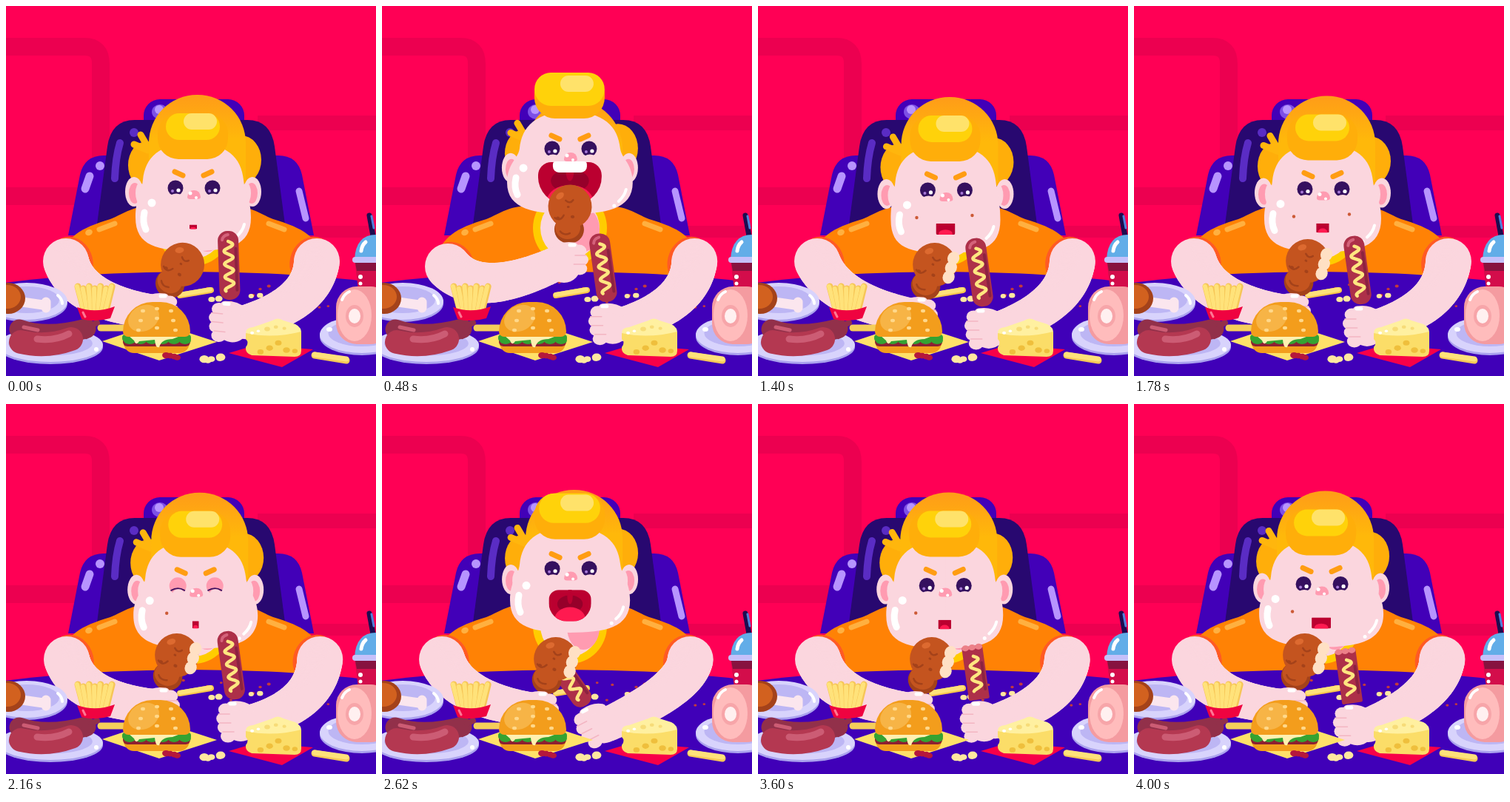
These frames come from a looping animation (500 by 500 pixels, 4020 ms). An HTML page with a canvas:

```html
<!DOCTYPE html>
<html>
<head>
<meta charset="utf-8">
<style>
html, body { margin: 0; width: 100%; height: 100%; overflow: hidden; background: #ff0055; }
canvas { display: block; width: 500px; height: 500px; }
</style>
</head>
<body>
<canvas id="stage" width="500" height="500"></canvas>
<script>
const ctx = document.getElementById('stage').getContext('2d');
const LOOP = 4020, STEP = 20;
const SKIN = '#fbd6de', PINK = '#ff9bb1', PURPLE = '#4200b8', LILAC = '#b794ff';
const HAIR = '#ffae0a', FRY = '#ffe27a', CREAM = '#ffe8a0';
const MEAT = '#c4541f', MEAT_DARK = '#a4421a', SAUSAGE = '#b43851', SAUSAGE_DARK = '#92304a';

const lerp = (a, b, u) => a + (b - a) * u;
const smooth = u => { u = Math.max(0, Math.min(1, u)); return u * u * (3 - 2 * u); };
// Rises from a to b, stays, falls from c to d.
const pulse = (t, a, b, c, d) => smooth((t - a) / (b - a)) * (1 - smooth((t - c) / (d - c)));

function shape(color, d) {
  ctx.fillStyle = color;
  ctx.fill(new Path2D(d));
}
function stroke(color, w, d) {
  ctx.strokeStyle = color;
  ctx.lineWidth = w;
  ctx.lineCap = ctx.lineJoin = 'round';
  ctx.stroke(new Path2D(d));
}
function oval(color, x, y, rx, ry = rx, rot = 0) {
  ctx.fillStyle = color;
  ctx.beginPath();
  ctx.ellipse(x, y, rx, ry, rot, 0, Math.PI * 2);
  ctx.fill();
}
function box(color, x, y, w, h, r) {
  ctx.fillStyle = color;
  ctx.beginPath();
  ctx.roundRect(x, y, w, h, r);
  ctx.fill();
}
function at(x, y, deg, draw) {
  ctx.save();
  ctx.translate(x, y);
  ctx.rotate(deg * Math.PI / 180);
  draw();
  ctx.restore();
}
// Draws a right half and its mirror image around x.
function mirrored(x, y, draw) {
  for (const side of [1, -1]) {
    ctx.save();
    ctx.translate(x, y);
    ctx.scale(side, 1);
    draw();
    ctx.restore();
  }
}
function scatter(color, seed, n, x, y, w, h, r) {
  const rnd = () => (seed = seed * 16807 % 2147483647) / 2147483647;
  rnd();
  for (let i = 0; i < n; i++) {
    const k = r * (0.7 + 0.5 * rnd());
    oval(color, x + (i + rnd()) / n * w, y + rnd() * h, k, k * 0.8);
  }
}

function drawRoom() {
  const band = '#ec0050';
  ctx.fillStyle = '#ff0055';
  ctx.fillRect(0, 0, 500, 500);
  ctx.lineCap = 'butt';
  ctx.strokeStyle = band;
  ctx.lineWidth = 24;
  ctx.stroke(new Path2D('M0 55H106Q128 55 128 78V205'));
  ctx.fillStyle = band;
  ctx.fillRect(340, 148, 160, 20);
  ctx.fillRect(0, 245, 110, 24);
  ctx.fillRect(405, 297, 95, 16);
}

function drawChair() {
  mirrored(250, 0, () => shape(PURPLE, 'M-1 202H118Q144 202 150 228L166 310H-1Z'));
  box(PURPLE, 186, 126, 136, 60, 22);
  oval('#7d50e6', 208, 143, 11, 10);
  oval(LILAC, 207, 140, 6);
  mirrored(250, 0, () => shape('#280870', 'M-1 154H76Q108 154 113 190L129 310H-1Z'));
  stroke('#5a2cc4', 10, 'M154 185Q148 205 147 233');
  oval('#5a2cc4', 173, 171, 6);
  stroke(LILAC, 11, 'M113 230L107 247');
  oval(LILAC, 127, 216, 6);
  stroke(LILAC, 9, 'M396 250L405 287');
}

function drawBody(s) {
  mirrored(251, 0, () => {
    shape('#ff8205', 'M-1 270H50C80 270 90 280 110 288C150 300 172 312 178 345L150 370H-1Z');
    stroke('#ffb040', 7, 'M104 294L125 302');
  });
  oval('#ffb040', 112, 306, 5, 4, -0.4);
  oval('#ff5a24', s.leftElbow + 7, 345 + s.lift * 7, 29, 34, -0.4);
  oval('#ff5a24', s.rightElbow - 7, 345, 29, 34, 0.4);
  oval('#ffcc00', 254, 300, 50, 51);
  oval(SKIN, 254, 300, 40, 41);
  oval(PINK, 272, 302, 22, 30);
}

function drawTable() {
  mirrored(250, 0, () => shape('#4000b8', 'M-1 359C80 360 160 362 251 374V500H-1Z'));
  scatter('#c33a3c', 11, 9, 235, 372, 135, 34, 2.3);
  scatter('#c33a3c', 5, 5, 408, 370, 32, 55, 2.3);
  stroke('#f7c74d', 8, 'M235 391L277 384');
  stroke(FRY, 6, 'M235 390L276 383');
  scatter(CREAM, 3, 2, 276, 395, 14, 4, 5);
  scatter(CREAM, 8, 2, 331, 390, 14, 3, 5);
}

function drawHairBack(cx, dy, p) {
  const y = dy - 16 * p, x = cx + 6;
  const top = lerp(120, 128, p) - 8 * Math.sin(Math.PI * p) + dy;
  oval(HAIR, cx - 62, 215 + y, 25, 32);
  oval(HAIR, cx + 66, 208 + y, 27, 33);
  at(cx - 60, 195 + y, 0, () => stroke('#ffb60d', 9, 'M0 0L-19 -8M0 -4L-10 -21'));
  const fade = ctx.createLinearGradient(0, top, 0, top + 60);
  fade.addColorStop(0, '#ff9c18');
  fade.addColorStop(1, '#ffb80a');
  box(fade, x - 65, top, 131, 235 + y - top, [65, 65, 0, 0]);
}

function drawQuiff(cx, dy, p) {
  const top = lerp(145, 89, p) + dy, inset = 11 * (1 - p);
  box(HAIR, cx - 47, top, 95, 62, 28);
  box('#ffd20a', cx - 47 + inset, top, 95 - 2 * inset, 36 + 9 * p, 18 + 4 * p);
  box('#ffe26a', cx - 12, top + 4 * p, 45, 22, 11);
}

function drawEye(x, y, closed) {
  oval(closed ? PINK : '#35105f', x, y, closed ? 11.5 : 10.5);
  if (closed) stroke('#3b0f5e', 2, `M${x - 9} ${y + 6}Q${x} ${y + 1} ${x + 9} ${y + 6}`);
  oval(SKIN, x + 1, y + 13, 9, closed ? 8.5 : 5.5);
  if (closed) return;
  oval('#fff', x + 4, y + 3, 2.6);
  oval('#a678d8', x - 4, y + 4, 2);
}

function drawMouth(x, y, w, h, p) {
  const a = w / 2, b = h / 2;
  ctx.save();
  ctx.translate(x, y);
  const round = lerp(0.15, 0.85, smooth(p / 0.3));
  ctx.beginPath();
  ctx.roundRect(-a, -b, w, h, [Math.min(a, b) * 0.75 * round, Math.min(a, b) * 0.75 * round, a * round, a * round]);
  ctx.clip();
  ctx.fillStyle = '#bb0030';
  ctx.fillRect(-a, -b, w, h);
  if (p > 0.1) {
    oval('#96002a', 0, -b * 0.1, a * 0.6, b * 0.55);
    oval('#bb0030', 0, -b * 0.6, a * 0.13, b * 0.5);
  }
  oval('#ff1a50', 0, b * 0.85, a * 0.72, b * 0.75);
  ctx.restore();
  const teeth = smooth((p - 0.5) / 0.4);
  if (teeth > 0) box('#fff', x - 23, y - b - 1, 46, 15 * teeth, [4, 4, 8, 8]);
}

function drawHead(s) {
  const { cx, dy, p } = s;
  const tilt = (rest, back) => lerp(rest, back, p) + dy;
  drawHairBack(cx, dy, p);
  mirrored(cx + 1, tilt(251, 218), () => {
    oval(SKIN, 80, 0, 12, 20);
    oval(PINK, 79, 2, 8, 14);
    oval(SKIN, 72, 2, 6, 14);
  });

  const top = tilt(185, 142), cheek = tilt(286, 238), chin = tilt(331, 280);
  const hw = 77 + s.wide + 7 * p, jaw = lerp(cheek, chin, 0.85);
  mirrored(cx + 1, 0, () => shape(SKIN, `M-1 ${top}C46 ${top} 65 ${top + 20} 68 ${top + 50}
    C70 ${cheek - 32} ${hw} ${cheek - 26} ${hw} ${cheek}C${hw} ${jaw} 48 ${chin} -1 ${chin}Z`));
  at(cx - hw, cheek, 0, () => {
    stroke('#fff', 9, 'M13 -7Q10 6 15 16');
    oval('#fff', 23, -20, 5.5);
  });
  at(cx + hw, cheek, 0, () => {
    stroke('#fff', 4, 'M-8 9Q-10 18 -18 25');
    oval('#fff', -24, 31, 2.5);
  });
  drawQuiff(cx, dy, p);

  mirrored(cx + 1, tilt(227, 177), () => stroke('#ff9d12', 7, 'M14 2L25 -3'));
  drawEye(cx - 23, tilt(246, 192), s.closed);
  drawEye(cx + 27, tilt(246, 192), s.closed);
  at(cx + 2, tilt(255, 203), 0, () => {
    shape(PINK, 'M-9 3Q-8 -6 0 -6Q8 -6 9 3Q9 6 4 6H-5Q-9 6 -9 3Z');
    oval('#fff', -5, -2, 2.5);
    oval('#fff', 3, 4, 2);
  });

  const open = smooth(p / 0.25);
  drawMouth(cx + 1, tilt(298.5, 238), lerp(s.mouthW, 34 + 53 * p, open), lerp(s.mouthH, 31 + 26 * p, open), p);
  if (s.crumbLeft) oval('#cc5a36', cx - 38, 283 + dy, 2.2);
  if (s.crumbRight) oval('#cc5a36', cx + 37, 280 + dy, 2.2);
}

function drawArm(ex, ey, mx, my, hx, hy) {
  for (let u = 0; u <= 1; u += 0.02) {
    const v = 1 - u;
    oval(SKIN, v * v * ex + 2 * u * v * mx + u * u * hx, v * v * ey + 2 * u * v * my + u * u * hy, lerp(31, 23, u));
  }
}

function drawFist(side, n) {
  oval(SKIN, -side * 6, 27, 23, 24);
  for (let i = 0; i < n; i++) {
    const y = 8 + i * 12, x = side * (13 + 4 * Math.sin((i + 0.3) * 1.1));
    oval(SKIN, x, y, 10, 8.5);
    if (i) stroke('#f3b5c2', 1.5, `M${x + side * 7} ${y - 6}H${x - side * 8}`);
  }
  stroke(SKIN, 13, `M${side * 7} 3Q${-side * 8} 1 ${-side * 17} 8`);
  stroke('#fff', 5, `M${side * 8} 0H${side * 2}`);
}

function drawHotdog(bitten) {
  const len = bitten ? 76 : 96;
  box('#ad3049', -14, -len, 28, len - 3, bitten ? 2 : 13);
  if (bitten) for (let x = -9; x < 14; x += 9) oval('#ec8088', x, 2 - len, 5, 4);
  else stroke('#d4627a', 4, `M-8 ${12 - len}Q-7 ${6 - len} 0 ${5 - len}`);
  stroke('#8c2340', 4, `M10 ${24 - len}V-16`);
  let d = `M0 ${14 - len}`;
  for (let y = 15 - len; y < -14; y++) d += `L${6 * Math.sin((y - 14 + len) * 0.36)} ${y}`;
  stroke('#ffe680', 4.5, d);
}

function drawDrumstick(bitten) {
  stroke('#ffe9e2', 10, 'M0 2V-20');
  oval(MEAT_DARK, 0, -27, 20, 19);
  oval(MEAT, 0, -58, 29.5);
  oval(MEAT, -2, -29, 17, 15);
  stroke(MEAT_DARK, 2.5, 'M-20 -42Q-12 -37 -8 -46M-6 -66Q0 -61 4 -67M-12 -24Q-7 -18 1 -22');
  oval('#dd6a30', -14, -72, 6, 4, -0.7);
  scatter(MEAT_DARK, 4, 3, -16, -62, 22, 24, 2.5);
  if (bitten) for (let i = 0; i < 3; i++) oval('#ffe0c4', 20 + 2 * i, -76 + 13 * i, 8, 9);
}

function rightSide(s) {
  const { x, y, deg } = s.right, hx = x + 17;
  at(x, y - 3, deg, () => drawHotdog(s.dogBitten));
  drawArm(s.rightElbow, 345, s.rightElbow - 6, 404 - (320 - hx) * 0.7, hx, y + 25);
  at(x, y, deg + 8, () => drawFist(-1, 4));
}

function leftSide(s) {
  const { x, y, deg } = s.left;
  at(x, y, deg, () => drawDrumstick(s.legBitten));
  drawArm(s.leftElbow, 345 + s.lift * 7, 97 + (x - 207) * 0.75, 400, x - 8, y + 15);
  at(x, y - 6, 0, () => drawFist(1, 3));
}

function plate(x, y, rx, ry) {
  oval('#aaa2ee', x, y + 3, rx, ry);
  oval('#d8d3fc', x, y, rx, ry);
  oval('#bdb6f4', x, y - 2, rx * 0.8, ry * 0.72);
}

function drawLeftFood() {
  plate(28, 399, 55, 25);
  stroke('#fbe6ee', 13, 'M15 399L50 404M54 400V408');
  oval(MEAT_DARK, 3, 395, 23, 21);
  oval('#d2611f', 2, 393, 18, 16);
  stroke('#fff', 4, 'M70 391Q76 396 76 402');

  plate(60, 458, 71, 23);
  stroke(SAUSAGE_DARK, 27, 'M18 437Q55 450 108 436');
  stroke(SAUSAGE_DARK, 8, 'M115 432L123 428M101 441L108 446');
  stroke(SAUSAGE, 32, 'M20 454Q55 462 88 450');
  stroke('#cc5c74', 9, 'M42 450Q66 453 85 443');
  stroke('#cc5c74', 5, 'M24 434L43 438');
  oval('#fff', 122, 464, 3);

  for (let i = 0; i < 7; i++) {
    const x = 97 + i * 7.7, y = 379 + 3 * (i % 2), foot = lerp(x, 121, 0.4);
    stroke('#f6c657', 9, `M${x} ${y}L${foot} 415`);
    stroke(FRY, 6, `M${x - 1} ${y}L${foot - 1} 415`);
  }
  shape('#ef0340', 'M96 407Q121 416 147 406L141 422Q120 428 102 423Z');
  stroke('#ff7794', 3, 'M104 414L107 420');
}

function drawBurger() {
  shape('#ffe169', 'M130 453L205 428L285 454L207 479Z');
  stroke('#f5ce5b', 9, 'M128 435H158');
  box('#f39d1c', 159, 447, 89, 22, [4, 4, 14, 14]);
  box('#8c2033', 158, 447, 91, 13, 6);
  box('#35a332', 157, 444, 93, 9, 4);
  for (let i = 0; i < 6; i++) oval('#35a332', 167 + i * 15, 452, 8, 5);
  shape('#fff0b0', 'M165 445H238L225 450Q210 450 207 461Q202 463 201 451L180 453Q176 460 173 452Z');
  box('#f39d1c', 158, 400, 91, 47, [45, 45, 8, 8]);
  oval('#f7b446', 186, 422, 22, 17, -0.5);
  for (let row = 0; row < 3; row++)
    for (let i = -1; i <= 1; i++) oval('#ffd88a', 204 + i * (19 + row * 3), 409 + row * 13 + 3 * i * i, 3, 2.3);
  scatter('#b5173c', 7, 4, 215, 471, 18, 5, 4.5);
  scatter(CREAM, 21, 5, 262, 474, 34, 5, 6);
}

function drawRightFood() {
  shape('#f80048', 'M301 469L338 458L415 464L373 488Z');
  stroke('#f5c857', 9, 'M417 472L460 479');
  stroke(FRY, 7, 'M417 471L460 477');
  shape('#fff0a0', 'M324 441Q324 435 334 434L360 425Q367 420 375 425L391 430Q400 434 399 444L340 455Z');
  shape('#fbdd68', 'M324 442Q360 450 399 440V466Q399 474 390 474L332 472Q323 469 324 461Q329 455 324 450Z');
  scatter('#efbf3c', 13, 5, 334, 453, 60, 15, 4);
  scatter('#f7dc78', 6, 3, 345, 432, 45, 6, 3.5);
  scatter('#fff', 2, 2, 328, 439, 18, 3, 3);

  stroke('#1d0c50', 7, 'M491 283L497 316');
  stroke('#4e83dc', 3, 'M494 284L497 300');
  shape('#d30d4b', 'M471 342H500V392H477Z');
  shape('#87123f', 'M472 347H500V358H474Z');
  shape('#62ade8', 'M471 342Q473 309 500 309V342Z');
  box('#c5c0fa', 468, 339, 40, 8, 4);
  stroke('#fff', 5, 'M480 331Q481 323 486 319');
  oval('#fff', 479, 366, 3);
  oval('#fff', 479, 375, 2.5);

  plate(481, 444, 57, 25);
  box('#f49ba0', 446, 379, 75, 78, 28);
  oval('#ffbcbc', 471, 418, 23, 35);
  oval('#f7a5a9', 471, 419, 12, 15);
  oval('#fff0f0', 471, 419, 8, 10);
  stroke('#fff', 4, 'M454 397Q457 389 464 386');
  oval('#fff', 437, 437, 4, 3);
}

function state(t) {
  const p = pulse(t, 140, 510, 530, 800) + pulse(t, 2450, 2820, 2840, 3110);
  const lift = pulse(t, 100, 470, 560, 850);
  const reach = pulse(t, 2420, 2620, 2890, 3700);
  const raise = pulse(t, 2620, 2820, 2890, 3540);
  const dip = pulse(t, 2420, 2620, 2640, 2840);
  const settle = smooth(t / 480), drift = Math.sin(Math.PI * t / 3200);

  // Chewing: one rhythm per bite, the cheeks in opposite phase the first time.
  const first = t < 2450;
  const env = pulse(t, 700, 900, 2300, 2450) + smooth((t - 3000) / 150);
  const chew = env * Math.cos(2 * Math.PI * (first ? (t - 1400) / 304 : (t - 4000) / 320));
  const puff = first ? -chew : chew;

  return {
    p, lift,
    cx: 252 + 2 * drift + 1.5 * puff,
    dy: (1.5 * drift - 1.5 * puff) * (1 - p),
    wide: 1 + env + 5 * puff,
    mouthW: 10 + 7.5 * env + 8.5 * chew,
    mouthH: 6 + 6.5 * env + 2.5 * chew,
    closed: (t > 2040 && t < 2300) || (t > 2960 && t < 3440),
    crumbLeft: t > 3500 || (t > 850 && first),
    crumbRight: t > 850 && t < 1800,
    leftElbow: 81 + 8 * lift + puff,
    rightElbow: 420 + 5 * drift - 6 * reach,
    left: {
      x: lerp(207 + 5 * settle - 4 * puff, 252, lift),
      y: lerp(398 - 5 * puff, 329, lift),
      deg: lerp(33 - 10 * settle, 2, lift)
    },
    right: {
      x: 303 + 6 * drift - 3 * chew - 28 * reach,
      y: 403 + 6 * Math.abs(drift) + 3 * chew + 6 * dip - 70 * raise,
      deg: -2 - 6 * settle - 27 * dip
    },
    legBitten: t > 600,
    dogBitten: t > 2880,
    dogFront: t > 2740
  };
}

function draw(t) {
  const s = state(t);
  drawRoom();
  drawChair();
  drawBody(s);
  drawTable();
  drawHead(s);
  const hands = [rightSide, leftSide];
  if (s.dogFront) hands.reverse();
  hands.forEach(hand => hand(s));
  drawLeftFood();
  drawBurger();
  drawRightFood();
}

const begin = performance.now();
function tick() {
  const t = (performance.now() - begin) % LOOP;
  draw(Math.floor(t / STEP) * STEP);
  requestAnimationFrame(tick);
}
tick();
</script>
</body>
</html>
```
